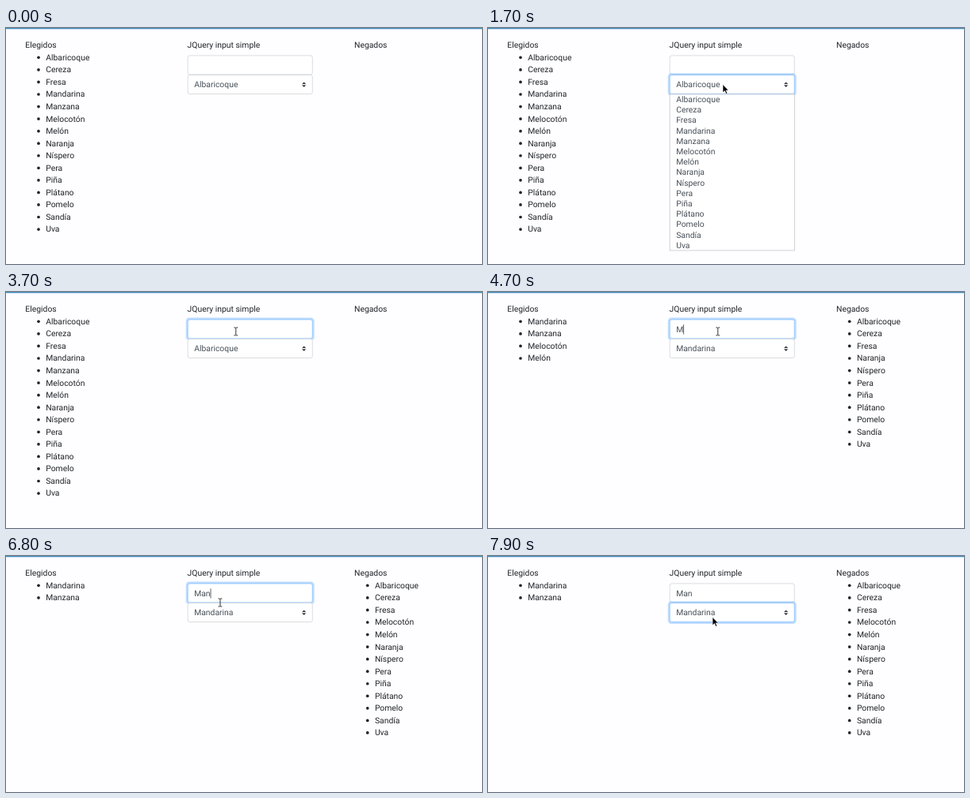
An HTML page for the animation above (8 s loop, 600 px wide and 299 px high).

```html
<!DOCTYPE html>
<html lang="es">
<head>
<meta charset="utf-8">
<title>JQuery input simple</title>
<style>
  html, body { margin: 0; width: 100%; height: 100%; overflow: hidden; background: #fefdff; }
  svg { display: block; width: 600px; height: 299px; }
  text { font: 10.37px Roboto, sans-serif; fill: #212529; text-rendering: geometricPrecision; white-space: pre; }
  .field { fill: #fff; stroke-width: .8; }
  .value { fill: #495057; }
</style>
</head>
<body>
<svg id="stage" viewBox="0 0 600 299"></svg>
<script>
const LOOP = 8000, TICK = 100;
const LINE = 15.55, ROW = 13.2;
const BOX = { x: 228.8, w: 157.8, h: 24.65 };
const INPUT_Y = 34.6, SELECT_Y = 59.25, POPUP_Y = 83.9;
const FRUIT = ['Albaricoque', 'Cereza', 'Fresa', 'Mandarina', 'Manzana', 'Melocotón', 'Melón',
  'Naranja', 'Níspero', 'Pera', 'Piña', 'Plátano', 'Pomelo', 'Sandía', 'Uva'];

// [time, value]
const TYPED = [[0, ''], [4300, 'M'], [5500, 'Ma'], [5600, 'Man']];
const QUERY = [[0, ''], [4700, 'M'], [5500, 'Ma'], [5600, 'Man']];
const CARET = [[0, 0], [3200, 1], [3700, 0], [4300, 1], [4800, 0], [5300, 1],
  [6300, 0], [6800, 1], [7100, 0]];
// [time, x, y] of the pointer
const PATH = [[200, 397, 119], [500, 370, 76], [700, 335, 51], [900, 306, 56], [1000, 300, 62],
  [1200, 295.4, 70], [1300, 295, 70.3], [1500, 296, 71.6], [2500, 296, 71.6], [2800, 293, 56],
  [3000, 289.8, 50], [6400, 289.8, 50], [6500, 180.6, 53], [6600, 180.6, 53], [6800, 270, 59],
  [7000, 284, 70], [7200, 286, 76], [7500, 287, 100], [7700, 285, 90], [7900, 283, 77.5]];

const stage = document.getElementById('stage');
const clamp = v => Math.max(0, Math.min(1, v));
const at = (steps, t) => steps.filter(s => s[0] <= t).pop()[1];
const ease = p => p * p * (3 - 2 * p);
const ramp = (t, start, len) => clamp((t - start) / len);

function add(parent, tag, attrs = {}, text = '') {
  const el = document.createElementNS('http://www.w3.org/2000/svg', tag);
  for (const k in attrs) el.setAttribute(k, attrs[k]);
  el.textContent = text;
  parent.append(el);
  return el;
}
const label = (parent, x, y, text, cls = '') => add(parent, 'text', { x, y, class: cls }, text);

function makeField(y) {
  const glow = add(stage, 'rect', { x: BOX.x - 2.07, y: y - 2.07, width: BOX.w + 4.14,
    height: BOX.h + 4.14, rx: 4.4, fill: '#007bff' });
  const box = add(stage, 'rect', { x: BOX.x + .35, y: y + .35, width: BOX.w - .7,
    height: BOX.h - .7, rx: 2.4, class: 'field' });
  return p => {
    const mix = (a, b) => Math.round(a + (b - a) * p);
    glow.setAttribute('opacity', .25 * p);
    box.setAttribute('stroke', `rgb(${mix(206, 128)},${mix(212, 189)},${mix(218, 255)})`);
  };
}

function fillList(group, x, items) {
  group.replaceChildren();
  items.forEach((name, i) => {
    const y = 40.75 + i * LINE;
    add(group, 'circle', { cx: x - 9.2, cy: y - 3.4, r: 1.85, fill: '#212529' });
    label(group, x, y, name);
  });
}

function fillPopup(items) {
  popup.replaceChildren();
  add(popup, 'rect', { x: BOX.x + .3, y: POPUP_Y, width: BOX.w - .6, height: items.length * ROW,
    fill: '#fff', stroke: '#b5b8bc', 'stroke-width': .65 });
  bars = items.map((name, i) => {
    const y = POPUP_Y + i * ROW;
    const bar = add(popup, 'rect', { x: 230, y, width: 155.6, height: ROW, fill: '#cfcfcf' });
    label(popup, 237.2, y + 10.1, name, 'value');
    return bar;
  });
}

add(stage, 'rect', { width: 600, height: 299, fill: '#fefdff' });
add(stage, 'rect', { width: 600, height: 1.3, fill: '#3c8dbc' });
label(stage, 24.3, 25.2, 'Elegidos');
label(stage, 228.6, 25.2, 'JQuery input simple');
label(stage, 439, 25.2, 'Negados');
const chosen = add(stage, 'g'), denied = add(stage, 'g');
const focusInput = makeField(INPUT_Y), focusSelect = makeField(SELECT_Y);
const typed = label(stage, 237.2, 51, '', 'value');
const picked = label(stage, 237.2, 75.3, '', 'value');
const caret = add(stage, 'rect', { y: 41.3, width: .8, height: 12.2, fill: '#343a40' });
add(stage, 'path', { d: 'M2 0L0 2h4zm0 5L0 3h4z', fill: '#343a40',
  transform: 'translate(373 68.4) scale(1.296)' });
const popup = add(stage, 'g');
let bars = [], lastQuery = null;

const arrow = add(stage, 'path', { d: 'M0 0V10.2L2.4 8L4.1 11.8L5.7 11.1L4.1 7.4H7.2Z',
  fill: '#000', stroke: '#fff', 'stroke-width': .6 });
const beam = add(stage, 'path', { d: 'M-2.4 -5H-.8L0 -4.4L.8 -5H2.4M0 -4.4V4.4M-2.4 5H-.8L0 4.4L.8 5H2.4',
  fill: 'none', stroke: '#333', 'stroke-width': 1 });

function pointer(t) {
  if (t < PATH[0][0]) return null;
  const i = PATH.findIndex(p => p[0] > t);
  if (i < 0) return PATH[PATH.length - 1].slice(1);
  const [t0, x0, y0] = PATH[i - 1], [t1, x1, y1] = PATH[i];
  const p = (t - t0) / (t1 - t0);
  return [x0 + (x1 - x0) * p, y0 + (y1 - y0) * p];
}

function movePointer(pos) {
  arrow.style.display = beam.style.display = 'none';
  if (!pos) return;
  const [x, y] = pos;
  const overInput = x > BOX.x && x < BOX.x + BOX.w && y > INPUT_Y && y < SELECT_Y;
  const shape = overInput ? beam : arrow;
  shape.style.display = '';
  shape.setAttribute('transform', `translate(${x} ${y})`);
}

function draw(t) {
  const query = at(QUERY, t), pos = pointer(t);
  if (query !== lastQuery) {
    const hits = FRUIT.filter(f => f.startsWith(query));
    fillList(chosen, 50.2, hits);
    fillList(denied, 464.9, FRUIT.filter(f => !hits.includes(f)));
    fillPopup(hits);
    picked.textContent = hits[0];
    lastQuery = query;
  }
  typed.textContent = at(TYPED, t);
  caret.setAttribute('x', 237.2 + (typed.textContent ? typed.getComputedTextLength() : 0));
  caret.style.display = at(CARET, t) ? '' : 'none';

  focusSelect(ease(ramp(t, 1450, 150)) - ease(ramp(t, 3050, 150)) + ease(ramp(t, 7050, 150)));
  focusInput(ease(ramp(t, 3050, 150)) - ease(ramp(t, 7050, 150)));

  const second = t >= 7100;
  popup.setAttribute('opacity', second ? +(t < 7900)
    : t >= 1500 ? 1 - ramp(t, 2200, 200) : 0);
  const hover = second && pos[1] > POPUP_Y + ROW ? 1 : 0;
  bars.forEach((bar, i) => bar.setAttribute('opacity',
    i !== hover ? 0 : second ? 1 : ramp(t, 1800, 300)));
  movePointer(pos);
}

function frame() {
  const t = performance.now() % LOOP;
  draw(Math.floor(t / TICK) * TICK);
  requestAnimationFrame(frame);
}
frame();
</script>
</body>
</html>
```
